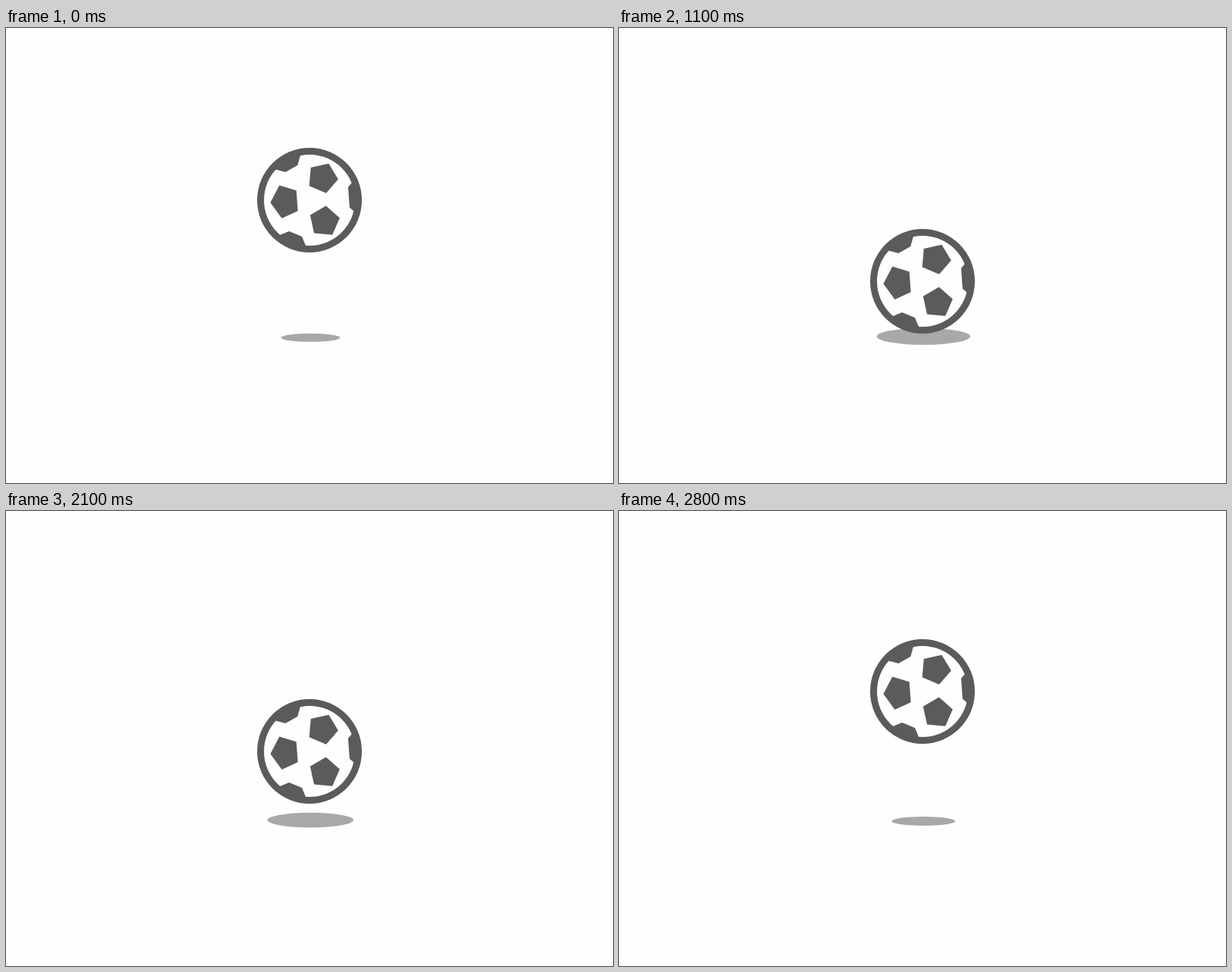
Recreate the animation shown at these times as an HTML page with a canvas. Size 800 by 600 pixels, loop 2900 ms.

```html
<!DOCTYPE html>
<html lang="en">
<head>
<meta charset="utf-8">
<title>Bouncing ball</title>
<style>
  html, body { margin: 0; width: 100%; height: 100%; overflow: hidden; background: #fefefe; }
  canvas { display: block; }
</style>
</head>
<body>
<canvas id="stage" width="800" height="600"></canvas>
<script>
const ctx = document.getElementById('stage').getContext('2d');
const LOOP = 2900, STEP = 100;
const PAPER = '#fefefe', INK = '#5b5b5d', SHADE = '#a8a8a8';
const RADIUS = 69, RING = 9;
const rad = degrees => degrees * Math.PI / 180;

// Fall, slow settling on the ground, then a slightly faster rise.
const keys = [
  { step: 0, top: 157.5, cy: 408.3, rx: 39, ry: 5.5 },
  { step: 12, top: 275.1, cy: 406.7, rx: 63.6, ry: 11.5 },
  { step: 18, top: 282, cy: 407, rx: 63, ry: 11.5 },
  { step: 29, top: 158, cy: 409.2, rx: 39.9, ry: 5.5 }
];

function pose(step) {
  const next = keys.findIndex(key => key.step > step);
  const from = keys[next - 1], to = keys[next];
  const part = (step - from.step) / (to.step - from.step);
  const mix = name => from[name] + (to[name] - from[name]) * part;
  return { top: mix('top'), cy: mix('cy'), rx: mix('rx'), ry: mix('ry') };
}

function ellipse(x, y, rx, ry, color) {
  ctx.beginPath();
  ctx.ellipse(x, y, rx, ry, 0, 0, Math.PI * 2);
  ctx.fillStyle = color;
  ctx.fill();
}

// Pentagon with one corner pointing along the turn, optionally squashed along it.
function pentagon(x, y, turn, length = 20.6, width = length) {
  ctx.save();
  ctx.translate(x, y);
  ctx.rotate(rad(turn));
  ctx.beginPath();
  for (let i = 0; i < 5; i++) {
    const angle = rad(72 * i);
    ctx.lineTo(length * Math.cos(angle), width * Math.sin(angle));
  }
  ctx.fill();
  ctx.restore();
}

// Patch that runs over the rim: a flat inner side, widening outwards.
function rimPatch(turn, distance, half) {
  const depth = RADIUS - distance;
  ctx.save();
  ctx.rotate(rad(turn));
  ctx.beginPath();
  ctx.moveTo(distance, -half);
  ctx.lineTo(distance, half);
  ctx.lineTo(RADIUS, half + depth);
  ctx.lineTo(RADIUS, -half - depth);
  ctx.fill();
  ctx.restore();
}

function drawBall(y) {
  ctx.save();
  ctx.translate(400, y);
  ellipse(0, 0, RADIUS, RADIUS, INK);
  ellipse(0, 0, RADIUS - RING, RADIUS - RING, PAPER);
  ctx.beginPath();
  ctx.arc(0, 0, RADIUS - RING / 2, 0, Math.PI * 2);
  ctx.clip();
  ctx.fillStyle = INK;
  pentagon(17.3, -29.4, 5);
  pentagon(19.7, 28, 59.6);
  pentagon(-32.1, 1.8, 175.8, 19.5, 23);
  rimPatch(-119.7, 47.8, 9.2);
  rimPatch(112.5, 48.2, 9.2);
  rimPatch(-4.1, 52, 13.5);
  ctx.restore();
}

function draw(now) {
  const { top, cy, rx, ry } = pose(Math.floor((now % LOOP) / STEP));
  ctx.fillStyle = PAPER;
  ctx.fillRect(0, 0, 800, 600);
  ellipse(401.3, cy, rx, ry, SHADE);
  drawBall(Math.round(top) + RADIUS);
}

let start;
function tick(now) {
  start ??= now;
  draw(Math.max(0, now - start));
  requestAnimationFrame(tick);
}
draw(0);
requestAnimationFrame(tick);
</script>
</body>
</html>
```
